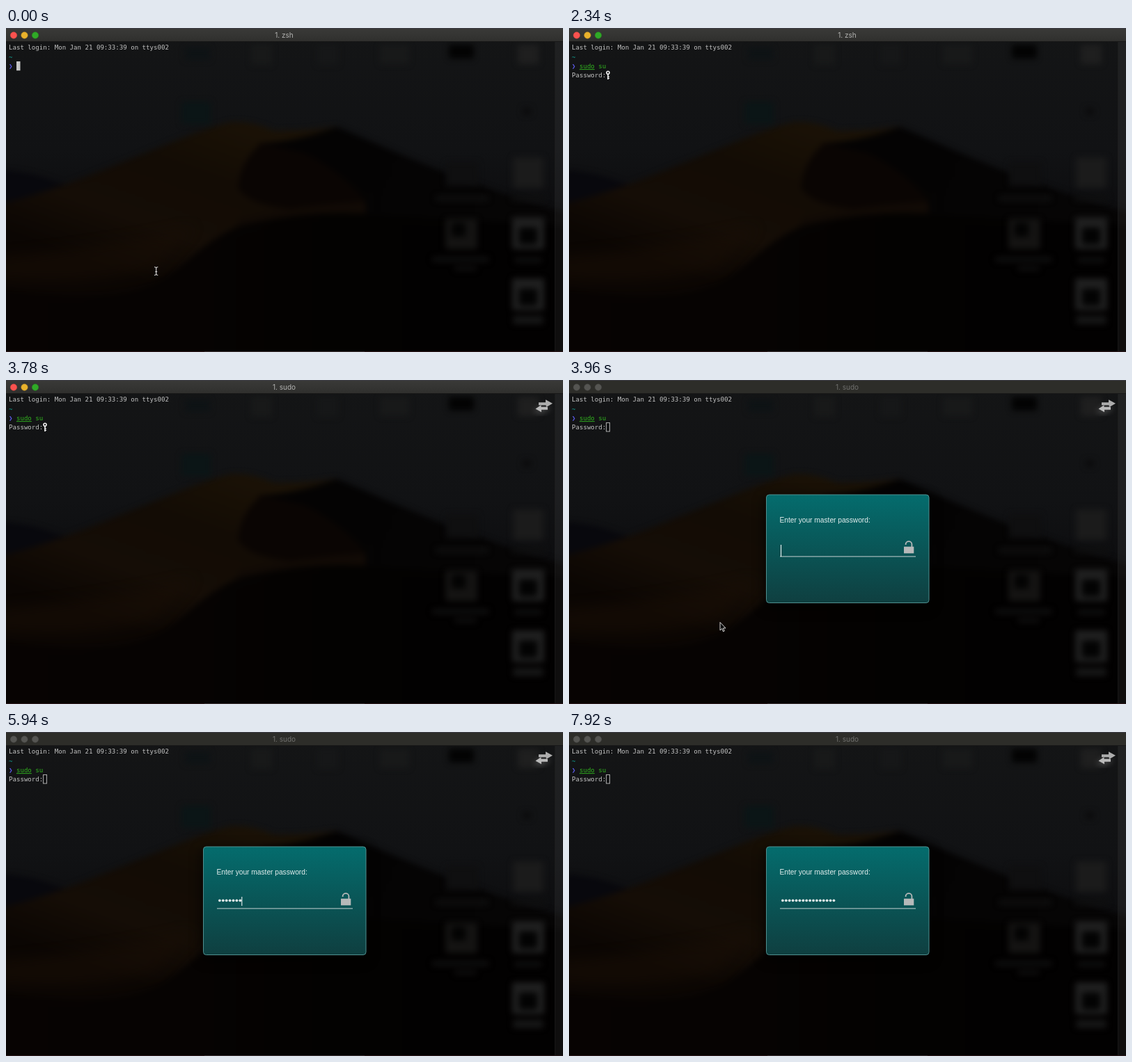
Write an HTML page that moves like this. It is 800 px wide and 466 px high and loops after 8 s.

```html
<!DOCTYPE html>
<html lang="en">
<head>
<meta charset="utf-8">
<title>Terminal password prompt</title>
<style>
html, body { margin: 0; width: 100%; height: 100%; overflow: hidden; background: #000; }
svg { display: block; width: 800px; height: 466px; }
filter { color-interpolation-filters: sRGB; }
text { white-space: pre; }
.mono { font: 9.1px "DejaVu Sans Mono", monospace; fill: #c3c3c3; }
.title { font: 10px Inter, "Liberation Sans", sans-serif; text-anchor: middle; fill: #b4b4b2; }
.label { font: 10.2px "Liberation Sans", sans-serif; fill: #e4eeee; }
.under { text-decoration: underline; }
.inactive .title { fill: #70706e; }
.inactive .light { fill: #555552; stroke: #484846; }
.inactive #bar { fill: #2d2d29; }
</style>
</head>
<body>
<svg viewBox="0 0 800 466">
  <defs>
    <linearGradient id="sky" x1="0" y1="0" x2="0" y2="1">
      <stop offset="0" stop-color="#141516"/>
      <stop offset=".6" stop-color="#111214"/>
      <stop offset="1" stop-color="#0c0c0e"/>
    </linearGradient>
    <linearGradient id="sand" gradientUnits="userSpaceOnUse" x1="330" y1="130" x2="240" y2="380">
      <stop offset="0" stop-color="#1b1206"/>
      <stop offset=".35" stop-color="#130c05"/>
      <stop offset=".7" stop-color="#150d06"/>
      <stop offset="1" stop-color="#0b0603"/>
    </linearGradient>
    <linearGradient id="shade" gradientUnits="userSpaceOnUse" x1="470" y1="170" x2="720" y2="260">
      <stop offset="0" stop-color="#040303"/>
      <stop offset="1" stop-color="#060505"/>
    </linearGradient>
    <linearGradient id="floor" x1="0" y1="0" x2="1" y2="0">
      <stop offset="0" stop-color="#070302"/>
      <stop offset=".35" stop-color="#060302"/>
      <stop offset=".6" stop-color="#030201"/>
      <stop offset="1" stop-color="#020101"/>
    </linearGradient>
    <linearGradient id="active" x1="0" y1="0" x2="0" y2="1">
      <stop offset="0" stop-color="#3a3a38"/>
      <stop offset="1" stop-color="#2f2f2d"/>
    </linearGradient>
    <linearGradient id="teal" x1="0" y1="0" x2="0" y2="1">
      <stop offset="0" stop-color="#046c6d"/>
      <stop offset="1" stop-color="#0f3f40"/>
    </linearGradient>
    <filter id="soft" x="-20%" y="-20%" width="140%" height="140%"><feGaussianBlur stdDeviation="4"/></filter>
    <filter id="haze" x="-20%" y="-20%" width="140%" height="140%"><feGaussianBlur stdDeviation="9"/></filter>
  </defs>

  <!-- dimmed desktop -->
  <rect width="800" height="466" fill="#020101"/>
  <rect width="800" height="290" fill="url(#sky)"/>
  <g filter="url(#soft)">
    <path d="M-20 203 Q30 206 60 217 T130 234 L60 270 H-20Z" fill="#08080d"/>
    <path d="M-20 256 C60 238 120 212 180 188 S290 142 325 135 Q355 134 385 148 Q440 148 475 141 L530 270 L300 400 H-20Z" fill="url(#sand)"/>
    <path d="M362 166 Q420 163 475 142 C520 160 575 187 640 211 S740 248 820 270 V480 H420 L515 256Z" fill="url(#shade)"/>
    <path d="M366 166 Q336 192 333 230 Q350 257 420 261 Q480 257 516 248 Q480 205 430 180Z" fill="#0a0503"/>
    <path d="M-20 374 C100 388 165 390 215 365 S290 295 360 276 Q430 259 520 268 L820 285 V486 H-20Z" fill="url(#floor)"/>
    <path d="M335 273 Q400 258 516 249 L517 267 Q420 262 330 286Z" fill="#110a05"/>
  </g>
  <path d="M-20 330 Q130 318 270 286 L215 345 Q120 372 -20 360Z" fill="#1a0f06" opacity=".5" filter="url(#haze)"/>
  <g id="icons" filter="url(#soft)"></g>
  <rect x="788" y="20" width="12" height="446" fill="#fff" opacity=".05"/>
  <path d="M788.5 20V466" stroke="#1c1c1c" opacity=".7"/>
  <path d="M0 465.5H800" stroke="#2b171a"/>
  <path d="M285 465.5H515" stroke="#3a3032"/>

  <g id="window">
    <rect id="bar" width="800" height="20" fill="url(#active)"/>
    <path d="M0 .5H800" stroke="#3c3c44"/>
    <path d="M0 19.5H800" stroke="#171717"/>
    <circle class="light" cx="11" cy="10.5" r="4.7" fill="#fa524f" stroke="#d9443f" stroke-width=".5"/>
    <circle class="light" cx="26.5" cy="10.5" r="4.7" fill="#e9b22c" stroke="#c99720" stroke-width=".5"/>
    <circle class="light" cx="42" cy="10.5" r="4.7" fill="#30a927" stroke="#238b1d" stroke-width=".5"/>
    <text id="title" class="title" x="399.5" y="14.3">1. zsh</text>
  </g>

  <g class="mono">
    <text x="4" y="31.4">Last login: Mon Jan 21 09:33:39 on ttys002</text>
    <text x="4" y="45" style="fill:#109a8c">~</text>
    <text x="4" y="58.2" style="fill:#5e5df0;font-weight:bold">❯</text>
    <text x="14.95" y="58.2"><tspan id="first"></tspan><tspan id="rest"></tspan></text>
    <text id="ask" x="4" y="71.4">Password:</text>
  </g>
  <rect id="block" x="15" y="48" width="5.5" height="13.2" fill="#c3c3c3"/>
  <rect id="hollow" x="53.5" y="61.5" width="5" height="12.5" fill="none" stroke="#aaa"/>
  <g id="key" fill="none" stroke="#f2f2f2">
    <circle cx="56" cy="64.3" r="2" stroke-width="1.6"/>
    <path d="M56 66.5V74" stroke-width="1.7"/>
    <path d="M56 70H58.2M56 72.4H58.2" stroke-width="1"/>
  </g>

  <g id="arrows">
    <path d="M757 45 L769 37 L783 40 L769 49Z" fill="#777" opacity=".5" filter="url(#soft)"/>
    <path d="M765 32.3H775V28.3L785 33.7L776 39L775.5 36.2H765Z" fill="#adadad"/>
    <path d="M760.5 41.5L768.5 36V38.7H778V42.7H769V46.3Z" fill="#bababa"/>
  </g>

  <g id="dialog">
    <rect x="281" y="168" width="238" height="160" rx="6" fill="#000" opacity=".65" filter="url(#haze)"/>
    <rect x="283.5" y="165" width="233.5" height="155.5" rx="4" fill="url(#teal)" stroke="#4f9090"/>
    <text class="label" x="302.5" y="205.2">Enter your master password:</text>
    <path d="M303 253.9H498" stroke="#c4d2d2"/>
    <rect x="481" y="239.7" width="14.3" height="9.6" fill="#b6b9b9"/>
    <path d="M483.6 237V236.2A4.4 4 0 0 1 492.4 236.2V240" fill="none" stroke="#b6b9b9" stroke-width="1.8"/>
    <g id="dots" fill="#dde6e6"></g>
    <rect id="caret" y="237" width="1" height="13" fill="#fff"/>
  </g>

  <g id="beam" fill="none" stroke="#ddd" stroke-width="1.1">
    <path d="M213 343.7Q215.5 343.7 215.7 345.5Q216 343.7 218.3 343.7M215.7 345V354.5M213 355.5Q215.5 355.5 215.7 353.8Q216 355.5 218.3 355.5M214.3 350.5H217.2"/>
  </g>
  <path id="pointer" d="M217 348.5V360L219.7 357.5L221.4 361.8L223.2 361L221.4 356.9H225Z" fill="#080808" stroke="#eee" stroke-width=".9"/>
</svg>

<script>
const $ = id => document.getElementById(id);
const NS = "http://www.w3.org/2000/svg";
const LOOP = 8000, STEP = 180, CHAR = 5.478, DOT = 4.9;
const GREEN = "#32b51f", RED = "#c23a2b";
const PAPER = "#1f1f1f", FAINT = "#181919", LABEL = "#0f0f0f", INK = "#030303";

function add(parent, tag, attrs) {
  const el = parent.appendChild(document.createElementNS(NS, tag));
  for (const name in attrs) el.setAttribute(name, attrs[name]);
  return el;
}

// Blurred desktop icons: centre x, centre y, width, height, colour
[
  [275, 37, 36, 18, "#0e1315"], [367, 38, 30, 30, FAINT],
  [462, 38, 30, 30, "#161718"], [558, 38, 42, 28, FAINT],
  [654, 34, 36, 20, INK], [750, 38, 30, 28, PAPER],
  [273, 122, 42, 32, "#0b1516"], [748, 120, 12, 10, "#0b0b0c"],
  [655, 210, 46, 34, "#0f0f10"], [655, 245, 76, 7, LABEL],
  [750, 208, 44, 44, "#1b1b1b"], [750, 245, 48, 7, LABEL],
  [654, 296, 46, 44, "#141312"], [650, 290, 20, 20, INK],
  [653, 333, 82, 7, LABEL], [660, 346, 32, 6, LABEL],
  [750, 295, 46, 46, PAPER], [750, 299, 26, 24, INK],
  [750, 334, 40, 7, LABEL],
  [750, 383, 46, 46, PAPER], [750, 387, 26, 24, INK],
  [750, 420, 44, 12, "#161616"]
].forEach(([x, y, width, height, fill]) =>
  add($("icons"), "rect", { x: x - width / 2, y: y - height / 2, width, height, rx: 3, fill }));

const dots = Array.from({ length: 16 }, (_, i) =>
  add($("dots"), "circle", { cx: 306.9 + i * DOT, cy: 242.3, r: 1.9 }));

// Start time and typed command
const typing = [[0, ""], [720, "s"], [900, "su"], [1080, "sud"],
  [1440, "sudo"], [1620, "sudo s"], [1800, "sudo su"]];

const show = (el, on) => el.style.visibility = on ? "visible" : "hidden";

function draw(t) {
  const command = typing.filter(([start]) => start <= t).pop()[1];
  const asking = t >= 2340, open = t >= 3960;
  const known = command.length >= 4;
  const count = Math.max(0, Math.min(16, Math.floor((t - 4860) / STEP) + 1));

  $("first").textContent = command.slice(0, 4);
  $("first").style.fill = known ? GREEN : RED;
  $("first").classList.toggle("under", known);
  $("rest").textContent = command.slice(4);
  $("rest").style.fill = command === "sudo su" ? GREEN : RED;
  $("block").setAttribute("x", 15 + command.length * CHAR);
  $("title").textContent = t < 3240 ? "1. zsh" : "1. sudo";
  $("window").classList.toggle("inactive", open);

  show($("block"), !asking);
  show($("ask"), asking);
  show($("key"), asking && !open);
  show($("hollow"), open);
  show($("arrows"), t >= 3780);
  show($("beam"), t < 720);
  show($("pointer"), open && t < 4860);
  show($("dialog"), open);
  dots.forEach((dot, i) => show(dot, open && i < count));

  const blink = t >= 4500 && t < 4860 || t >= 7920;
  $("caret").setAttribute("x", 304 + count * DOT);
  $("caret").setAttribute("height", count ? 13 : 17);
  show($("caret"), open && !blink);
}

const origin = performance.now();
function tick() {
  draw((performance.now() - origin) % LOOP);
  requestAnimationFrame(tick);
}
tick();
</script>
</body>
</html>
```
